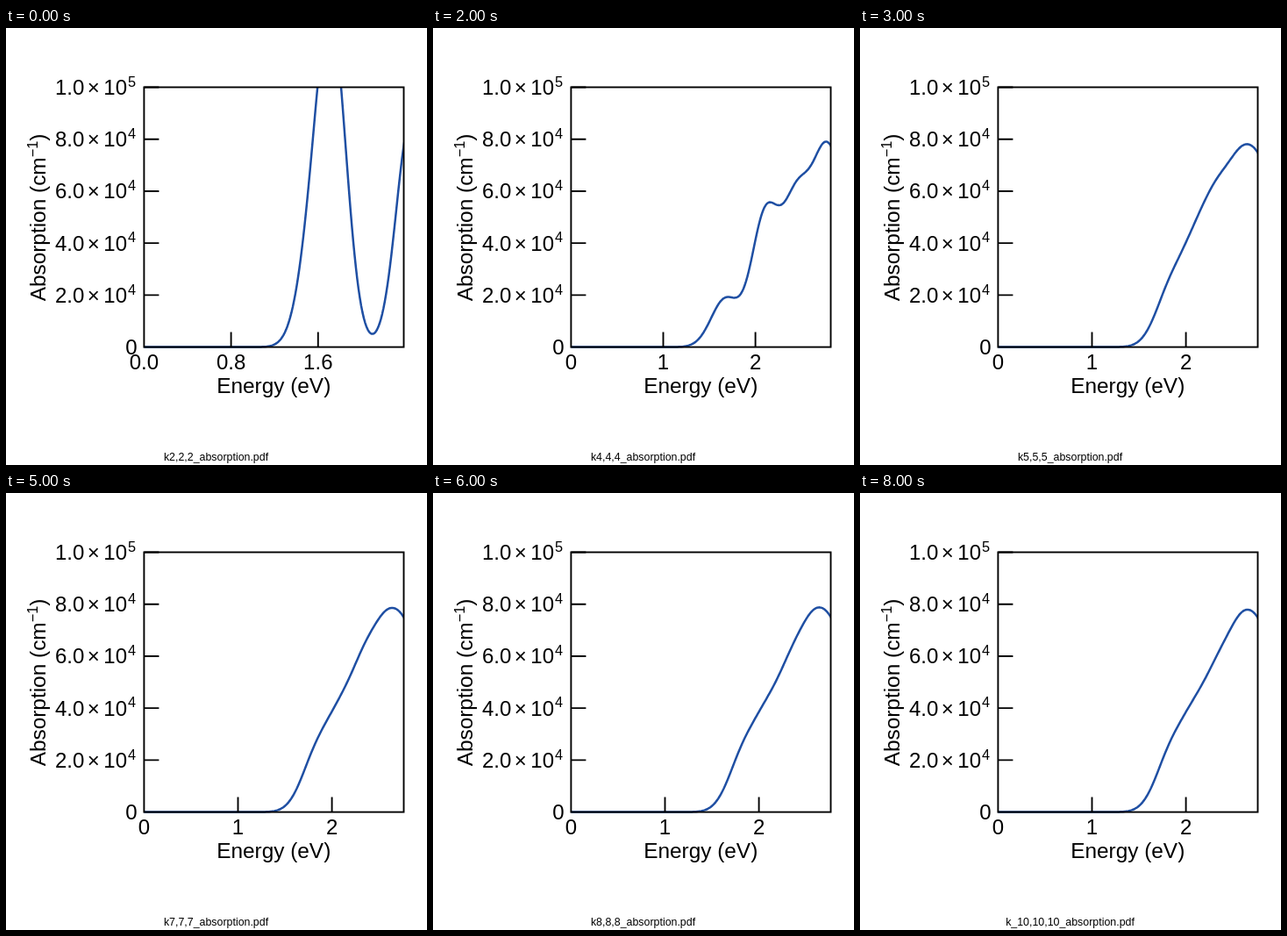
An HTML page that plays this animation: 480 px wide and 498 px high, repeating every 9000 ms.

```html
<!DOCTYPE html>
<html lang="en">
<head>
<meta charset="utf-8">
<title>Absorption convergence</title>
<style>
  html, body { margin: 0; width: 100%; height: 100%; overflow: hidden; background: #fff; }
  svg { display: block; width: 480px; height: 498px; }
  text { font: 24px "Liberation Sans", Arial, sans-serif; fill: #000; }
  .title { font-size: 24.4px; }
  .sup { font-size: 16.3px; }
  .mid { text-anchor: middle; }
  .end { text-anchor: end; }
  .caption { font-size: 12.4px; }
  .axis { fill: none; stroke: #000; stroke-width: 1.9; }
  .curve { fill: none; stroke: #1f4fa3; stroke-width: 2.5; stroke-linejoin: round; }
</style>
</head>
<body>
<svg viewBox="0 0 480 498">
  <clipPath id="plot"><rect x="157" y="67" width="296.5" height="299"/></clipPath>
  <path id="curve" class="curve" clip-path="url(#plot)"/>
  <path id="ticks" class="axis"/>
  <rect class="axis" x="157.4" y="67.5" width="296.1" height="296.1"/>
  <g id="yLabels"></g>
  <g id="xLabels"></g>
  <text class="mid title" x="305.2" y="416.2">Energy (eV)</text>
  <text class="mid title" transform="translate(44.7 216) rotate(-90)">Absorption (cm<tspan class="sup" dy="-9">−1</tspan><tspan dy="9">)</tspan></text>
  <text id="caption" class="mid caption" x="239.5" y="493"></text>
</svg>
<script>
const LEFT = 157.4, RIGHT = 456, BASE = 363.6, UNIT = 59.22;
const FIRST = 2, LAST = 10, HOLD = 1000;

// Coarse grids: pixels per eV, line width, and peaks as [centre, height].
const coarse = {
  2: { scale: 124, sigma: 16.5, peaks: [[350, 100], [372, 338], [461.5, 258]] },
  3: { scale: 118.6, sigma: 19, peaks: [[356, 118], [433.5, 279], [474, 87]] },
  4: { scale: 105.1, sigma: 16, peaks: [[333, 54], [379, 148], [415, 155], [448, 195], [478, 120]] }
};

// Dense grids share evenly spaced peaks; one extra bump drifts right and fades as k grows.
function spectrum(k) {
  if (coarse[k]) return coarse[k];
  const peaks = [57, 84, 119, 160, 148].map((height, i) => [353 + 28 * i, height]);
  peaks.push([397 + 7 * (k - 5), 3.2 * (LAST - k)]);
  return { scale: 107.1, sigma: 17, peaks };
}

const $ = id => document.getElementById(id);
const label = (x, y, cls, body) => `<text class="${cls}" x="${x}" y="${y}">${body}</text>`;

function curvePath({ sigma, peaks }) {
  const points = [];
  for (let x = LEFT; x < RIGHT; x += 1.5) {
    const h = peaks.reduce((sum, [c, a]) => sum + a * Math.exp(-(((x - c) / sigma) ** 2) / 2), 0);
    points.push(`${x.toFixed(2)} ${(BASE - h).toFixed(2)}`);
  }
  return "M" + points.join("L");
}

const levels = [1, 2, 3, 4, 5];
const yTicks = levels.map(i => `M${LEFT} ${BASE - i * UNIT}h17`).join("");
$("yLabels").innerHTML = label(149.5, 372, "end", "0") + levels.map(i => {
  const y = BASE - i * UNIT + 8.5, top = i === 5;
  return label(56, y, "", top ? "1.0" : (2 * i) + ".0") + label(92.7, y, "", "×") +
    label(111.3, y, "", "10") + label(139, y - 9.2, "sup", top ? 5 : 4);
}).join("");

function show(k) {
  const run = spectrum(k), wide = k > FIRST;
  const step = wide ? 1 : 0.8;
  const marks = [0, 1, 2].map(n => ({ x: LEFT + n * step * run.scale, name: (n * step).toFixed(wide ? 0 : 1) }));
  $("curve").setAttribute("d", curvePath(run));
  $("ticks").setAttribute("d", yTicks + marks.slice(1).map(t => `M${t.x} ${BASE}v-17`).join(""));
  $("xLabels").innerHTML = marks.map(t => label(t.x, 389, "mid", t.name)).join("");
  $("caption").textContent = `k${k > 9 ? "_" : ""}${k},${k},${k}_absorption.pdf`;
}

let current;
function tick() {
  const k = FIRST + Math.floor(performance.now() / HOLD) % (LAST - FIRST + 1);
  if (k !== current) show(current = k);
  requestAnimationFrame(tick);
}
tick();
</script>
</body>
</html>
```
